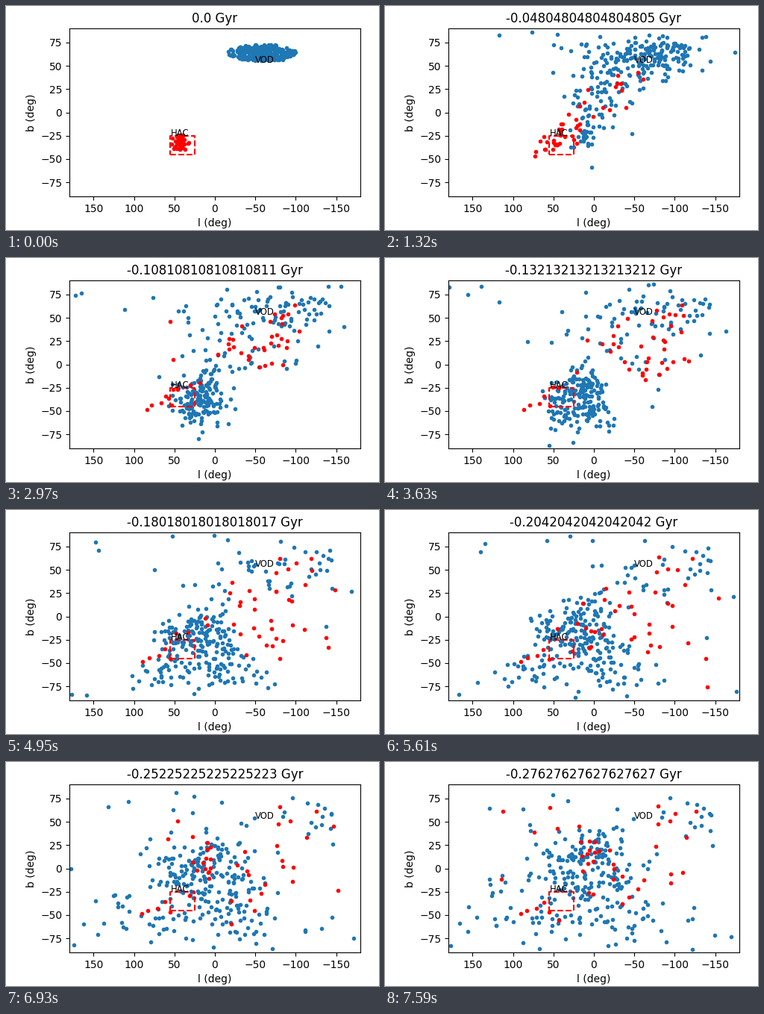
Write a matplotlib script that moves like this. It is 500 px wide and 300 px high and loops after 7920 ms.

```python
import numpy as np
import matplotlib.pyplot as plt
from matplotlib.animation import FuncAnimation

FRAMES, INTERVAL = 24, 330
STRIDE, SUBSTEPS = 12, 24
SUN = np.array([-8.0, 0.0, 0.0])  # kpc from the galactic centre
times = np.linspace(0, -1, 1000)  # Gyr
rng = np.random.default_rng(12)


def to_xyz(l, b, dist):
    l, b = np.radians(l), np.radians(b)
    direction = [np.cos(b) * np.cos(l), np.cos(b) * np.sin(l), np.sin(b)]
    return SUN + dist[:, None] * np.transpose(direction)


def to_sky(pos):
    x, y, z = (pos - SUN).T
    return np.degrees([np.arctan2(y, x), np.arctan2(z, np.hypot(x, y))])


def acceleration(pos):
    """Logarithmic halo, flattened disc and small bulge (kpc, Myr)."""
    x, y, z = pos.T
    r2 = (pos ** 2).sum(axis=1)
    central = 0.19 ** 2 / (r2 + 36) + 0.045 / (r2 + 0.25) ** 1.5
    height = np.sqrt(z ** 2 + 0.09)
    disc = 0.28 / (x ** 2 + y ** 2 + (3 + height) ** 2) ** 1.5
    acc = -pos * (central + disc)[:, None]
    acc[:, 2] -= disc * z * 3 / height
    return acc


def orbits(pos, radial, tangential):
    """Sky positions per frame of stars on mostly radial orbits."""
    n = len(pos)
    outward = pos / np.linalg.norm(pos, axis=1)[:, None]
    vel = outward * rng.normal(0, radial, (n, 1))
    vel += rng.normal(0, tangential, (n, 3))
    dt = (times[0] - times[STRIDE]) * 1000 / SUBSTEPS
    track = [to_sky(pos)]
    for _ in range(FRAMES - 1):
        for _ in range(SUBSTEPS):
            vel = vel + acceleration(pos) * dt / 2
            pos = pos + vel * dt
            vel = vel + acceleration(pos) * dt / 2
        track.append(to_sky(pos))
    return track


def virgo_stars(n):
    u = 2 * rng.beta(1.9, 2.2, n) - 1
    low, high = 55.5 + 9 * u ** 4, 73 - 7 * u ** 2
    b = rng.uniform(low, high)
    return to_xyz(-58 + 45 * u, b, rng.normal(15, 2.5, n).clip(9, 22))


def hercules_stars(n):
    l = rng.normal(44, 6, n).clip(30, 54)
    b = -24 - 21 * rng.beta(1, 1.8, n)
    return to_xyz(l, b, rng.normal(16, 2.5, n).clip(10, 22))


virgo = orbits(virgo_stars(285), 0.15, 0.07)
hercules = orbits(hercules_stars(44), 0.19, 0.055)

fig, ax = plt.subplots(figsize=(5, 3), dpi=100)
fig.subplots_adjust(left=0.17, right=0.95, bottom=0.15, top=0.9)
ax.set(xlim=(180, -180), ylim=(-90, 90), xlabel="l (deg)", ylabel="b (deg)",
       xticks=range(150, -151, -50), yticks=range(-75, 76, 25))

virgo_dots, = ax.plot([], [], ".", color="C0")
hercules_dots, = ax.plot([], [], ".", color="r")
ax.plot([55, 25, 25, 55, 55], [-45, -45, -25, -25, -45], "r--")
ax.text(-50, 53, "VOD", fontsize="small")
ax.text(55, -25, "HAC", fontsize="small")
title = ax.set_title("0.0 Gyr")


def update(frame):
    virgo_dots.set_data(*virgo[frame])
    hercules_dots.set_data(*hercules[frame])
    title.set_text(f"{times[frame * STRIDE]} Gyr")
    return virgo_dots, hercules_dots, title


anim = FuncAnimation(fig, update, frames=FRAMES, interval=INTERVAL,
                     repeat=True, repeat_delay=0)
plt.show()
```
